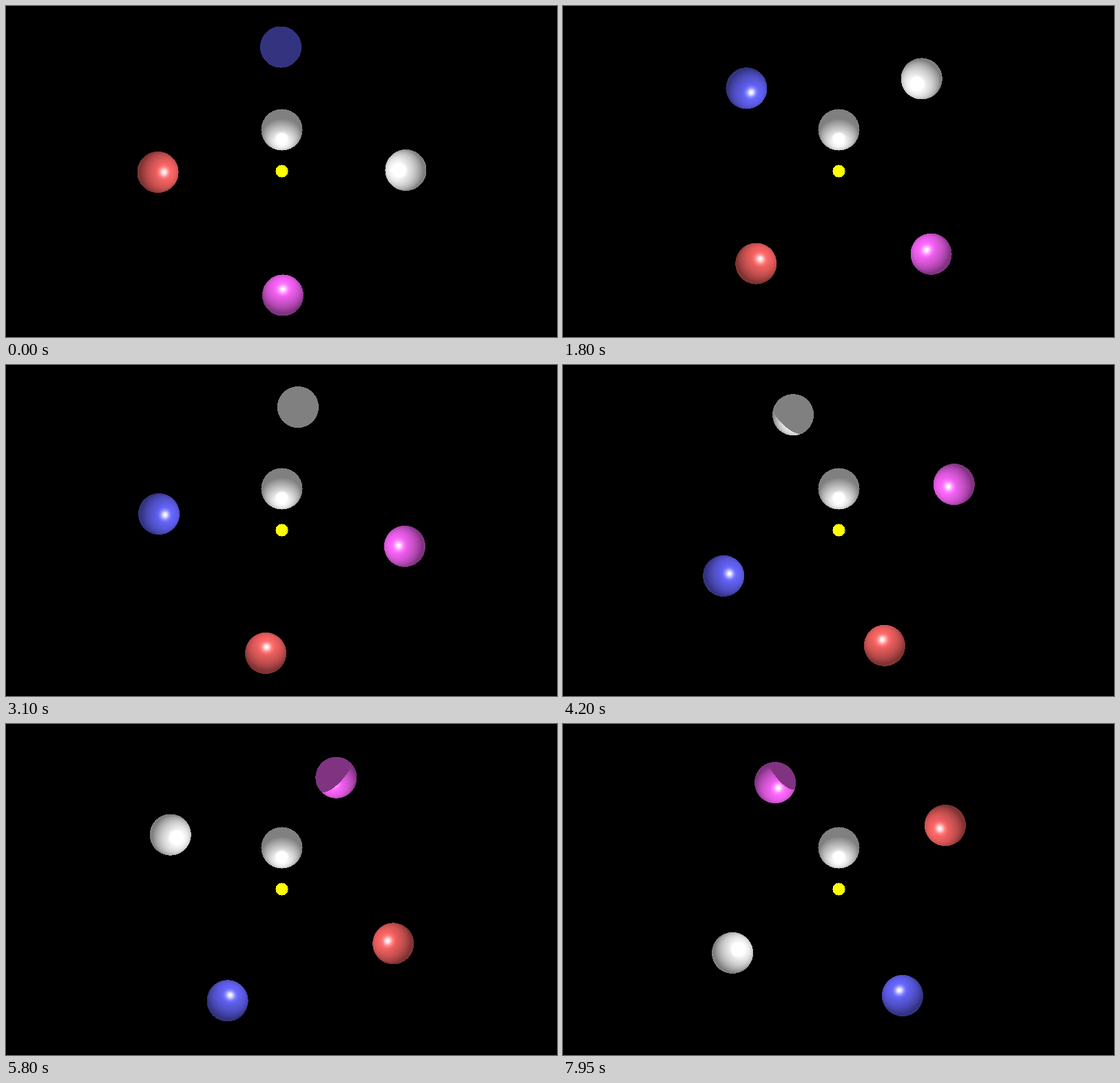
Write an HTML page with a canvas that moves like this. It is 800 px wide and 480 px high and loops after 8 s.

```html
<!DOCTYPE html>
<html lang="en">
<head>
<meta charset="utf-8">
<title>Orbiting spheres</title>
<style>
  html, body { margin: 0; width: 100%; height: 100%; overflow: hidden; background: #000; }
  canvas { display: block; }
</style>
</head>
<body>
<canvas id="stage" width="800" height="480"></canvas>
<script>
const ctx = document.getElementById('stage').getContext('2d');
const WIDTH = 800, HEIGHT = 480;
const LOOP = 8000, STEP = 50;
const CENTER = { x: 400.5, y: 239.5 };
const RADIUS = 30, ORBIT = 180;
const START = 0.47, DEGREES_PER_STEP = 90 / 68;

// Coordinates are relative to the light; z points towards the viewer.
const BLOCKER = { x: 0, y: -60, z: -75, color: [255, 255, 255] };
const ORBIT_Z = -340, EYE_Z = 1200;
const AMBIENT = 0.5, DIFFUSE = 0.5, SPECULAR = 0.6, SHININESS = 10;
const ORBIT_COLORS = [[255, 255, 255], [102, 102, 255], [255, 102, 102], [255, 102, 255]];

// True when the ray from the light to the point passes through the blocker.
function inShadow(x, y, z) {
  const along = x * BLOCKER.x + y * BLOCKER.y + z * BLOCKER.z;
  const blocker2 = BLOCKER.x ** 2 + BLOCKER.y ** 2 + BLOCKER.z ** 2;
  const point2 = x * x + y * y + z * z;
  return along > 0 && blocker2 - along * along / point2 < RADIUS * RADIUS;
}

// Phong shading at a surface point with unit normal (nx, ny, nz).
function shade(x, y, z, nx, ny, nz) {
  const distance = Math.hypot(x, y, z);
  const lx = -x / distance, ly = -y / distance, lz = -z / distance;
  const facing = nx * lx + ny * ly + nz * lz;
  if (facing <= 0) return [AMBIENT, 0];
  const vz = EYE_Z - z;
  const mirrored = (2 * facing * nx - lx) * -x + (2 * facing * ny - ly) * -y + (2 * facing * nz - lz) * vz;
  const glint = Math.max(0, mirrored / Math.hypot(x, y, vz));
  return [AMBIENT + DIFFUSE * facing, SPECULAR * glint ** SHININESS];
}

function drawSphere(pixels, ball) {
  const cx = CENTER.x + ball.x, cy = CENTER.y + ball.y;
  for (let py = Math.floor(cy - RADIUS); py <= cy + RADIUS; py++) {
    for (let px = Math.floor(cx - RADIUS); px <= cx + RADIUS; px++) {
      const dx = px + 0.5 - cx, dy = py + 0.5 - cy;
      const depth2 = RADIUS * RADIUS - dx * dx - dy * dy;
      if (depth2 < 0) continue;
      const dz = Math.sqrt(depth2);
      const x = ball.x + dx, y = ball.y + dy, z = ball.z + dz;
      const dark = ball !== BLOCKER && inShadow(x, y, z);
      const [body, glint] = dark ? [AMBIENT, 0] : shade(x, y, z, dx / RADIUS, dy / RADIUS, dz / RADIUS);
      const i = (py * WIDTH + px) * 4;
      for (let c = 0; c < 3; c++) pixels[i + c] = ball.color[c] * body + 255 * glint;
    }
  }
}

function drawLight(pixels) {
  for (let dy = -9; dy <= 9; dy++) {
    for (let dx = -9; dx <= 9; dx++) {
      if (dx * dx + dy * dy > 81) continue;
      const i = ((239 + dy) * WIDTH + 400 + dx) * 4;
      pixels[i] = pixels[i + 1] = 255;
    }
  }
}

function render(step) {
  const image = ctx.createImageData(WIDTH, HEIGHT);
  const pixels = image.data;
  for (let i = 3; i < pixels.length; i += 4) pixels[i] = 255;
  ORBIT_COLORS.forEach((color, k) => {
    const angle = (START + step * DEGREES_PER_STEP + 90 * k) * Math.PI / 180;
    drawSphere(pixels, { x: ORBIT * Math.cos(angle), y: -ORBIT * Math.sin(angle), z: ORBIT_Z, color });
  });
  drawSphere(pixels, BLOCKER);
  drawLight(pixels);
  ctx.putImageData(image, 0, 0);
}

let shown = -1;
const begin = performance.now();
function tick() {
  const step = Math.floor((performance.now() - begin) % LOOP / STEP);
  if (step !== shown) render(shown = step);
  requestAnimationFrame(tick);
}
tick();
</script>
</body>
</html>
```
